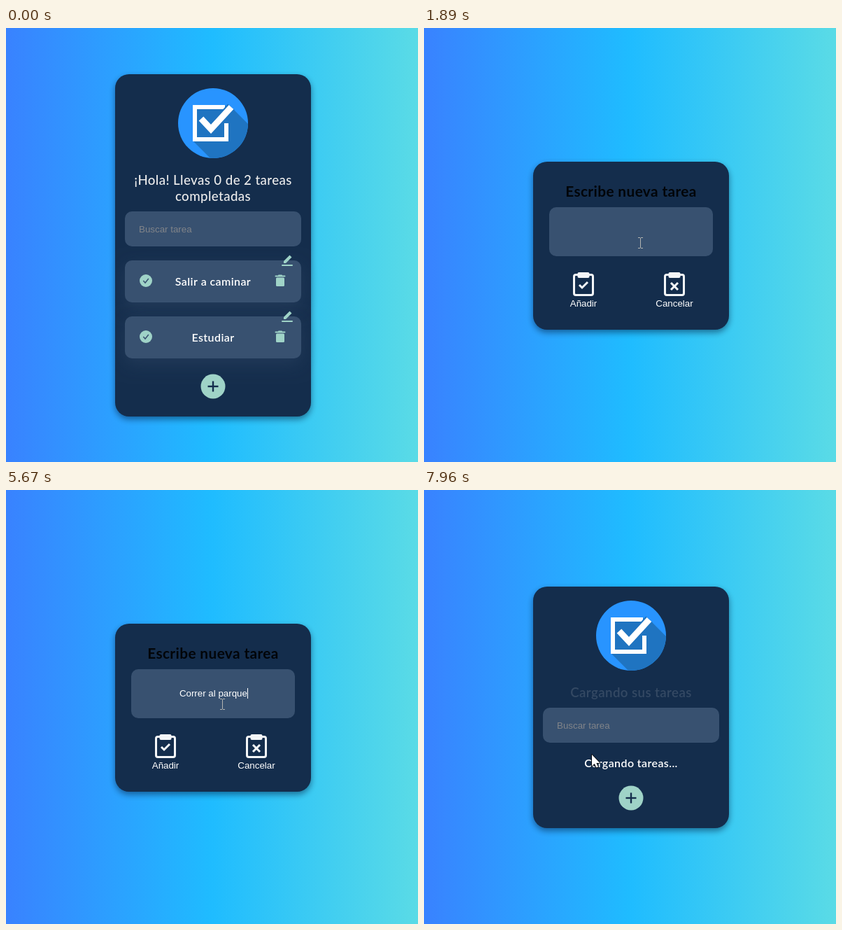
An HTML page with a canvas for the animation above (8000 ms loop, 589x620 px).

```html
<!DOCTYPE html>
<html lang="es">
<head>
<meta charset="utf-8">
<title>Lista de tareas</title>
<style>
html, body { margin: 0; width: 100%; height: 100%; overflow: hidden; background: #1fbcff; }
canvas { display: block; }
</style>
</head>
<body>
<canvas id="stage" width="589" height="620"></canvas>
<script>
const c = document.getElementById('stage').getContext('2d');
const LOOP = 8000, STEP = 1000 / 15, CX = 296;
const NAVY = '#142d4c', SLATE = '#385170', MINT = '#9fd3c7', PALE = '#f4f6f8';
const ROUND = 'Lato, "Open Sans", sans-serif';
const PLAIN = '"Liberation Sans", Arial, sans-serif';

const ARROW = new Path2D('M0 0V16.5L3.8 13L6.5 18.6L9 17.5L6.4 12H11.5Z');
const HAND = new Path2D('M-2 2Q0-2 2 2V8Q4 6 5.5 8.5Q7.5 7 9 9.5Q11 8.5 11 11V15Q11 18 9 20V22H0V20Q-4 16-6.5 12Q-5 9-2 12Z');
const PENCIL = new Path2D('M-5 5.5V2.5L3.5-6L6.5-3L-2 5.5Z');

const PHRASE = 'Correr al parque';
// [time, letters typed]
const KEYS = [[2940, 1], [3140, 2], [3470, 3], [3600, 4], [3800, 5], [4080, 6], [4540, 7],
  [4740, 8], [4800, 9], [4870, 10], [5070, 11], [5140, 12], [5340, 13], [5540, 15], [5670, 16]];

const bg = c.createLinearGradient(0, 0, 589, 0);
bg.addColorStop(0, '#3982ff');
bg.addColorStop(0.5, '#1fbcff');
bg.addColorStop(1, '#5adbe6');

const clamp = v => Math.max(0, Math.min(1, v));
const ease = v => v * v * (3 - 2 * v);
const progress = (t, a, b) => ease(clamp((t - a) / (b - a)));
const mix = (a, b, k) => a + (b - a) * k;
const between = (t, a, b) => t >= a && t < b;

function box(x, y, w, h, r, color) {
  c.fillStyle = color;
  c.beginPath();
  c.roundRect(x, y, w, h, r);
  c.fill();
}

function disc(x, y, r, color) {
  c.fillStyle = color;
  c.beginPath();
  c.arc(x, y, r, 0, 7);
  c.fill();
}

function line(points, width, color) {
  c.strokeStyle = color;
  c.lineWidth = width;
  c.beginPath();
  points.forEach(([x, y]) => c.lineTo(x, y));
  c.stroke();
}

function poly(points, color) {
  c.fillStyle = color;
  c.beginPath();
  points.forEach(([x, y]) => c.lineTo(x, y));
  c.fill();
}

function at(x, y, scale, draw) {
  c.save();
  c.translate(x, y);
  c.scale(scale, scale);
  draw();
  c.restore();
}

function text(str, x, y, font, color, align = 'center') {
  c.font = font;
  c.letterSpacing = font.includes('Lato') ? '0.4px' : '0px';
  c.textAlign = align;
  c.fillStyle = color;
  c.fillText(str, x, y);
}

function shaded(color, blur, dy, draw) {
  c.save();
  c.shadowColor = color;
  c.shadowBlur = blur;
  c.shadowOffsetY = dy;
  draw();
  c.restore();
}

function card(y, h) {
  shaded('rgba(0,20,50,.5)', 10, 4, () => box(156, y, 280, h, 20, NAVY));
}

function badge(y) {
  at(CX, y, 1, () => {
    disc(0, 0, 50, '#2894ff');
    c.save();
    c.clip();
    poly([[-29, 25], [-29, -25], [17, -25], [29, -20], [79, 30], [21, 75]], '#1f74c1');
    c.restore();
    line([[17, -23], [-26, -23], [-26, 23], [19, 23], [19, 0]], 6, '#fff');
    line([[-17, -6.5], [-3, 8.5], [26, -23]], 13, '#1f74c1');
    line([[-17, -6.5], [-3, 8.5], [26, -23]], 9, '#fff');
  });
}

function search(y) {
  box(170, y, 252, 50, 10, SLATE);
  text('Buscar tarea', 190, y + 30, '13.333px ' + PLAIN, '#818489', 'left');
}

function plus(y, scale) {
  at(CX, y, scale, () => {
    disc(0, 0, 17.5, MINT);
    line([[-7.5, 0], [7.5, 0]], 2.4, NAVY);
    line([[0, -7.5], [0, 7.5]], 2.4, NAVY);
  });
}

function task(label, y) {
  shaded('rgba(56,81,112,.35)', 24, 8, () => box(170, y, 252, 60, 10, SLATE));
  text(label, CX, y + 36, '600 16px ' + ROUND, '#fff');
  disc(200, y + 29, 9, MINT);
  line([[196.3, y + 29], [199, y + 32], [203.8, y + 26]], 1.5, SLATE);
  box(389, y + 20.5, 6, 2, 1, MINT);
  box(384.5, y + 21.5, 15, 2, 1, MINT);
  box(386, y + 24.5, 12, 12.5, 1.5, MINT);
  at(402, y - 1.5, 1, () => {
    c.fillStyle = MINT;
    c.fill(PENCIL);
  });
  box(394, y + 6, 16, 2, 1, MINT);
}

function clipButton(x, label, marks, scale) {
  at(x, 374, scale, () => {
    c.strokeStyle = PALE;
    c.lineWidth = 3;
    c.beginPath();
    c.roundRect(-13.5, -21.5, 27, 29, 2.5);
    c.stroke();
    box(-8.5, -25, 17, 8, 2, PALE);
    marks.forEach(m => line(m, 3, PALE));
    text(label, 0, 24, '13.333px ' + PLAIN, '#fff');
  });
}

function listScene(t) {
  card(66, 489);
  badge(136);
  const head = '500 18.72px ' + ROUND;
  text('¡Hola! Llevas 0 de 2 tareas', CX, 224, head, '#ececec');
  text('completadas', CX, 247, head, '#ececec');
  search(262);
  task('Salir a caminar', 332);
  task('Estudiar', 412);
  plus(512, 1 + 0.2 * progress(t, 760, 1020));
}

function typed(t) {
  let n = 0;
  for (const [when, count] of KEYS) if (t >= when) n = count;
  return PHRASE.slice(0, n);
}

function formScene(t) {
  card(191, 240);
  text('Escribe nueva tarea', CX, 241, 'bold 20.8px ' + ROUND, '#020509');
  box(179, 256, 234, 70, 10, SLATE);
  const str = typed(t);
  text(str, CX + 0.4, 295, '13.333px ' + PLAIN, '#fff');
  const caret = between(t, 2030, 2550) || between(t, 2940, 6200) || between(t, 6730, 7300);
  if (caret) {
    c.fillStyle = '#fff';
    c.fillRect(Math.round(CX + c.measureText(str).width / 2), 283, 1, 15);
  }
  const grow = 1 + 0.2 * progress(t, 6780, 7370);
  clipButton(228, 'Añadir', [[[-6, -7], [-2, -3], [6, -11]]], grow);
  clipButton(358, 'Cancelar', [[[-5, -10], [5, 0]], [[5, -10], [-5, 0]]], 1);
}

function loadScene(t) {
  card(138, 345);
  badge(208);
  const glow = t < 7690 ? 0.06 : 0.15;
  text('Cargando sus tareas', CX, 296, '600 18.72px ' + ROUND, `rgba(236,236,236,${glow})`);
  search(311);
  text('Cargando tareas...', CX, 396, '600 16px ' + ROUND, '#fff');
  plus(440, 1);
}

function pointer(shape, x, y) {
  at(x, y, 1, () => {
    c.lineJoin = 'round';
    c.lineWidth = 1.6;
    c.strokeStyle = '#000';
    c.stroke(shape);
    c.fillStyle = '#fff';
    c.fill(shape);
  });
}

function beam(x, y) {
  c.fillStyle = '#b4b5b1';
  c.fillRect(x, y - 7, 1, 14);
  for (const dy of [-8, 7]) {
    c.fillRect(x - 3, y + dy, 3, 1);
    c.fillRect(x + 1, y + dy, 3, 1);
  }
}

function cursor(t) {
  const s = Math.floor((t + 7) / STEP) * STEP;
  if (between(t, 260, 1220)) {
    const k = progress(s, 190, 1020);
    const hover = k > 0.8 && t < 1160;
    pointer(hover ? HAND : ARROW, mix(451, 295.5, k), mix(596, 514, k));
  } else if (between(t, 1220, 6070)) {
    const k = progress(s, 1360, 1890);
    const x = mix(295.5, 309, k), y = mix(514, 306, k);
    if (y < 326) beam(Math.round(x), Math.round(y));
    else pointer(ARROW, x, y);
  } else if (between(t, 6470, 6790)) {
    const k = progress(s, 6400, 6800);
    pointer(ARROW, mix(487, 221, k), mix(519, 356, k));
  } else if (t >= 6790) {
    const k = progress(s, 6830, 7200);
    const done = t >= 7960;
    pointer(done ? ARROW : HAND, mix(221, 240, k), mix(356, 378, k));
  }
}

function frame(now) {
  const t = now % LOOP;
  c.lineJoin = 'miter';
  c.fillStyle = bg;
  c.fillRect(0, 0, 589, 620);
  if (t < 1220) listScene(t);
  else if (t < 7560) formScene(t);
  else loadScene(t);
  cursor(t);
}

const start = performance.now();
function tick() {
  frame(performance.now() - start);
  requestAnimationFrame(tick);
}
tick();
</script>
</body>
</html>
```
